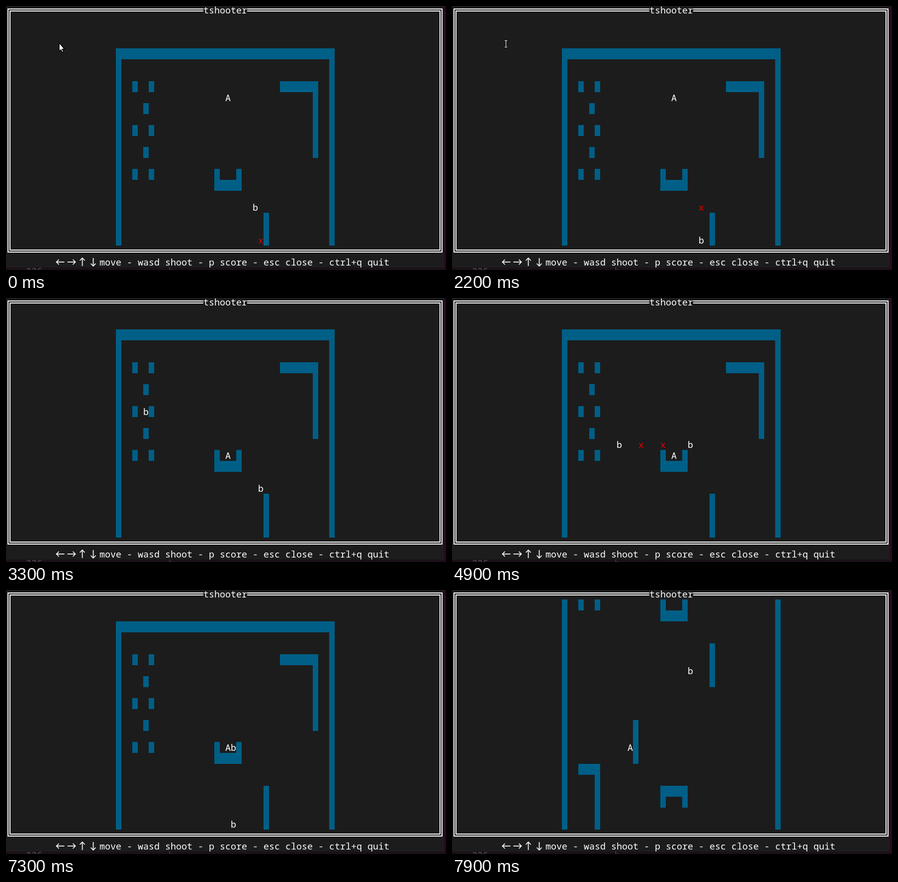
Animation of 885 by 530 pixels, one loop 8000 ms. Source, as an HTML page with a canvas:

```html
<!DOCTYPE html>
<html lang="en">
<head>
<meta charset="utf-8">
<title>tshooter</title>
<style>
  html, body { margin: 0; width: 100%; height: 100%; overflow: hidden; background: #1c1c1c; }
  canvas { display: block; }
</style>
</head>
<body>
<canvas id="stage" width="885" height="530"></canvas>
<script>
const ctx = document.getElementById('stage').getContext('2d');
const LOOP = 8000, TICK = 100, STRIDE = 200;
const CELL_W = 11, CELL_H = 22, BASELINE = 18;
const FIELD_X = 221, FIELD_Y = 19, COLS = 40, ROWS = 21;
const BG = '#1c1c1c', WALL = '#005f87', INK = '#ffffff', RED = '#e60000', EDGE = '#2a0720';
const FONT = '18.33px "Noto Sans Mono", "DejaVu Sans Mono", monospace';

function rect(color, x, y, w, h) {
  ctx.fillStyle = color;
  ctx.fillRect(x, y, w, h);
}

function type(text, x, baseline, color = INK) {
  ctx.fillStyle = color;
  [...text].forEach((ch, i) => ctx.fillText(ch, x + i * CELL_W, baseline));
}

function line(points) {
  ctx.beginPath();
  for (const [x, y] of points) ctx.lineTo(x, y);
}

// Actors: a leg walks one cell per stride, on both axes, until it reaches its goal.
const cell = (col, row) => ({ col, row });
const leg = (start, goal, stride = STRIDE) => ({ start, goal, stride });

function approach(from, to, steps) {
  return from + Math.sign(to - from) * Math.min(Math.abs(to - from), steps);
}

function walker(glyph, born, dies, home, ...legs) {
  const at = t => legs.reduce((pos, { start, goal, stride }) => {
    const steps = Math.max(0, Math.floor((t - start) / stride));
    return cell(approach(pos.col, goal.col, steps), approach(pos.row, goal.row, steps));
  }, home);
  return { glyph, at, alive: t => t >= born && t < dies };
}

function shot(born, life, from, dCol, dRow) {
  const cells = life / TICK;
  const goal = cell(from.col + dCol * cells, from.row + dRow * cells);
  return walker('x', born, born + life, from, leg(born, goal, TICK));
}

// Two bullets on one row fly at each other until they meet.
function duel(born, left, right, row) {
  const life = Math.ceil((right - left) / 2) * TICK;
  return [shot(born, life, cell(left, row), 1, 0), shot(born, life, cell(right, row), -1, 0)];
}

const RESPAWN = 7600;
const players = [
  walker('A', 0, RESPAWN, cell(20, 4), leg(2200, cell(20, 11), 150)),
  walker('A', RESPAWN, LOOP, cell(12, 22), leg(RESPAWN, cell(12, 24), 150))
];
const actors = [
  ...players,
  walker('b', 0, 2200, cell(25, 14)),
  walker('b', 1900, 7500, cell(25, 17),
    leg(2300, cell(26, 14)), leg(3300, cell(23, 10), 300),
    leg(5300, cell(22, 10)), leg(7100, cell(21, 11))),
  walker('b', 2500, 7100, cell(1, 3), leg(2500, cell(10, 10)), leg(5300, cell(12, 10))),
  walker('b', 7300, LOOP, cell(21, 18), leg(7500, cell(23, 17))),
  shot(0, 800, cell(26, 17), 0, -1),
  shot(2000, 300, cell(25, 16), 0, -1),
  ...duel(4500, 10, 22, 10),
  ...duel(5900, 13, 21, 10),
  ...duel(6600, 13, 21, 10)
];

function drawWalls() {
  const bar = (col, row, w, h) => rect(WALL, col * CELL_W, row * CELL_H, w * CELL_W, h * CELL_H);
  const cup = (row, baseRow) => {
    bar(18, row, 1, 2);
    bar(22, row, 1, 2);
    bar(18, baseRow, 5, 1);
  };
  const hook = (col, row, w) => {
    bar(col, row, w, 1);
    bar(col + w - 1, row, 1, 7);
  };
  bar(0, 0, COLS, 1);
  for (const col of [0, COLS - 1]) bar(col, 0, 1, 60);
  for (let i = 0; i < 5; i++) {
    for (const col of i % 2 ? [5] : [3, 6]) bar(col, 3 + 2 * i, 1, 1);
  }
  hook(30, 3, 7);
  cup(11, 12);
  bar(27, 15, 1, 4);
  bar(13, 22, 1, 4);
  hook(3, 26, 4);
  cup(28, 28);
}

function drawField(t) {
  // The view scrolls so that the player never goes below row 13.
  const top = Math.min(3, 13 - players.find(p => p.alive(t)).at(t).row);
  ctx.save();
  ctx.beginPath();
  ctx.rect(FIELD_X, FIELD_Y, COLS * CELL_W, ROWS * CELL_H);
  ctx.clip();
  ctx.translate(FIELD_X, FIELD_Y + top * CELL_H);
  drawWalls();
  for (const { glyph, at, alive } of actors) {
    if (!alive(t)) continue;
    const { col, row } = at(t);
    type(glyph, col * CELL_W, row * CELL_H + BASELINE, glyph === 'x' ? RED : INK);
  }
  ctx.restore();
}

function drawArrow(x, y, angle) {
  const half = 8;
  ctx.save();
  ctx.translate(x, y);
  ctx.rotate(angle);
  ctx.strokeStyle = INK;
  ctx.lineWidth = 1.7;
  line([[-half, 0], [half, 0]]);
  ctx.stroke();
  line([[half - 5, -5], [half, 0], [half - 5, 5]]);
  ctx.stroke();
  ctx.restore();
}

function drawFrame() {
  rect(BG, 0, 0, 885, 530);
  rect(EDGE, 881, 0, 4, 530);
  rect('#1b1018', 0, 525, 881, 5);

  ctx.strokeStyle = INK;
  ctx.lineWidth = 2;
  ctx.strokeRect(4, 6, 873, 488);
  ctx.strokeRect(8, 10, 865, 480);
  rect(BG, 397, 0, 88, 19);
  type('tshooter', 397, FIELD_Y - CELL_H + BASELINE);

  [Math.PI, 0, -Math.PI / 2, Math.PI / 2]
    .forEach((angle, i) => drawArrow(109.5 + i * 2 * CELL_W, 514, angle));
  type('move - wasd shoot - p score - esc close - ctrl+q quit', 188,
    FIELD_Y + 22 * CELL_H + BASELINE);

  // Tops of the letters in the window behind
  ctx.save();
  ctx.beginPath();
  ctx.rect(0, 525, 881, 5);
  ctx.clip();
  type('226', 40, 539, '#5a545a');
  type('b', 327, 539, '#453f44');
  ctx.restore();
}

function drawPointer(t) {
  if (t < 300) {
    line([[107, 74], [107, 91], [110.6, 87.6], [113, 93], [115.6, 92], [113.2, 86.6], [117.5, 86.2]]);
    ctx.closePath();
    ctx.fillStyle = INK;
    ctx.fill();
    ctx.strokeStyle = '#000';
    ctx.lineWidth = 1.4;
    ctx.stroke();
  } else if (t < 2400) {
    rect(INK, 108, 70, 1, 13);
    for (const y of [69, 82]) rect(INK, 106, y, 5, 1);
  }
}

function render(elapsed) {
  const t = Math.floor((elapsed % LOOP) / TICK) * TICK;
  ctx.font = FONT;
  drawFrame();
  drawField(t);
  drawPointer(t);
}

const start = performance.now();
function loop() {
  render(performance.now() - start);
  requestAnimationFrame(loop);
}
loop();
</script>
</body>
</html>
```
